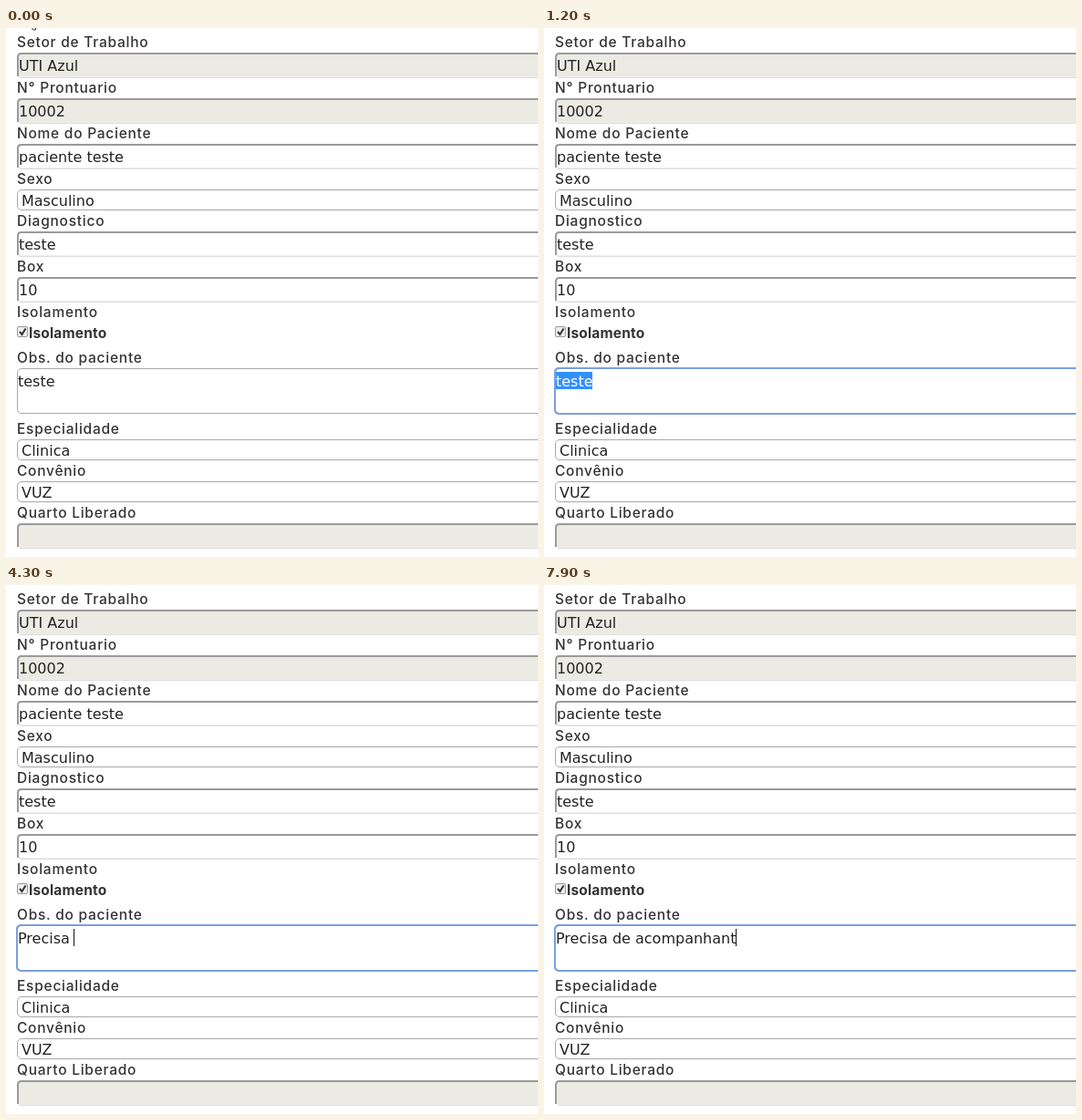
Write an HTML page that moves like this. It is 583 px wide and 580 px high and loops after 8000 ms.

```html
<!DOCTYPE html>
<html lang="pt">
<head>
<meta charset="utf-8">
<title>Cadastro de paciente</title>
<style>
  html, body { margin: 0; width: 100%; height: 100%; overflow: hidden; background: #fff; }
  svg { display: block; width: 583px; height: 580px; }
  text { white-space: pre; }
  .label { font: 500 15.5px Inter, sans-serif; letter-spacing: .75px; fill: #333; }
  .bold { font: 700 15.5px Inter, sans-serif; letter-spacing: .15px; fill: #333; }
  .value { font: 16px "DejaVu Sans", sans-serif; fill: #222; }
</style>
</head>
<body>
<svg id="stage" viewBox="0 0 583 580"></svg>
<script>
const LOOP = 8000;
const stage = document.getElementById("stage");

function add(tag, attrs, text) {
  const node = document.createElementNS("http://www.w3.org/2000/svg", tag);
  for (const key in attrs) node.setAttribute(key, attrs[key]);
  if (text) node.textContent = text;
  return stage.appendChild(node);
}

const write = (cls, x, y, text) => add("text", { class: cls, x, y }, text);
const label = (y, text) => write("label", 12, y, text);
const show = (node, on) => node.setAttribute("visibility", on ? "visible" : "hidden");

// Inset box: dark top and left edges, pale bottom edge.
function input(y, text, disabled) {
  add("rect", { x: 12, y, width: 600, height: 28, rx: 5, fill: "#eee" });
  add("path", { d: `M12 ${y + 26}V${y + 5}q0-5 5-5H600V${y + 3}H16L14 ${y + 26}Z`, fill: "#9a9a9a" });
  add("rect", { x: 14, y: y + 2, width: 600, height: 24, rx: 3, fill: disabled ? "#ebebe4" : "#fff" });
  add("path", { d: `M15 ${y + 27.5}H583`, stroke: "#ddd", fill: "none" });
  write("value", 14, y + 20, text);
}

function outline(y, height) {
  return add("rect", { x: 12.5, y: y + .5, width: 600, height: height - 1, rx: 4.5, fill: "#fff", stroke: "#a9a9a9" });
}

function select(y, text) {
  outline(y, 23);
  write("value", 17, y + 18, text);
}

label(21, "Setor de Trabalho");
input(27, "UTI Azul", true);
label(71, "N° Prontuario");
input(77, "10002", true);
label(121, "Nome do Paciente");
input(127, "paciente teste");
label(171, "Sexo");
select(177, "Masculino");
label(217, "Diagnostico");
input(223, "teste");
label(267, "Box");
input(273, "10");
label(317, "Isolamento");

add("rect", { x: 12.5, y: 327.5, width: 11, height: 11, rx: 1.5, fill: "#eee", stroke: "#999" });
add("path", { d: "M15 333l2.5 3 4-6.5", fill: "none", stroke: "#333", "stroke-width": 2 });
write("bold", 25, 340, "Isolamento");

label(367, "Obs. do paciente");
outline(373, 50);
const focus = add("rect", { x: 12, y: 373, width: 600, height: 50, rx: 4, fill: "none", stroke: "#7b9fe0", "stroke-width": 2 });
const mark = add("rect", { x: 13, y: 377, width: 40, height: 19, fill: "#3390ff" });
const note = write("value", 13, 393, "");
const caret = add("rect", { y: 377, width: 1, height: 19, fill: "#111" });

label(445, "Especialidade");
select(451, "Clinica");
label(491, "Convênio");
select(497, "VUZ");
label(537, "Quarto Liberado");
input(543, "", true);

const pointer = add("path", { d: "M28.5 0l1.5 2h2.5V0", fill: "none", stroke: "#333" });

// Times of each keystroke; the thirteenth letter is erased and typed again.
const phrase = "Precisa de acompanhant";
const keys = [3200, 3400, 3500, 3700, 3800, 4000, 4100, 4300, 4400, 4500, 4600, 4800, 4900,
  5700, 5900, 7000, 7100, 7400, 7500, 7600, 7800, 7900];
const within = (t, from, to) => t >= from && t < to;

function noteAt(t) {
  if (t < 2200) return "teste";
  const typed = keys.filter(k => k <= t).length;
  return phrase.slice(0, within(t, 5400, 5500) ? typed - 1 : typed);
}

function draw(t) {
  const text = noteAt(t);
  const selected = within(t, 1200, 2200);
  if (note.textContent !== text) note.textContent = text;
  note.style.fill = selected ? "#fff" : "";
  show(mark, selected);
  show(focus, t >= 1100);
  show(pointer, t < 100);
  show(caret, t >= 1100 && !selected && !within(t, 2700, 3200) && !within(t, 6400, 6900));
  caret.setAttribute("x", 13 + Math.floor(text ? note.getComputedTextLength() : 0));
}

function tick() {
  draw(performance.now() % LOOP);
  requestAnimationFrame(tick);
}
tick();
</script>
</body>
</html>
```
